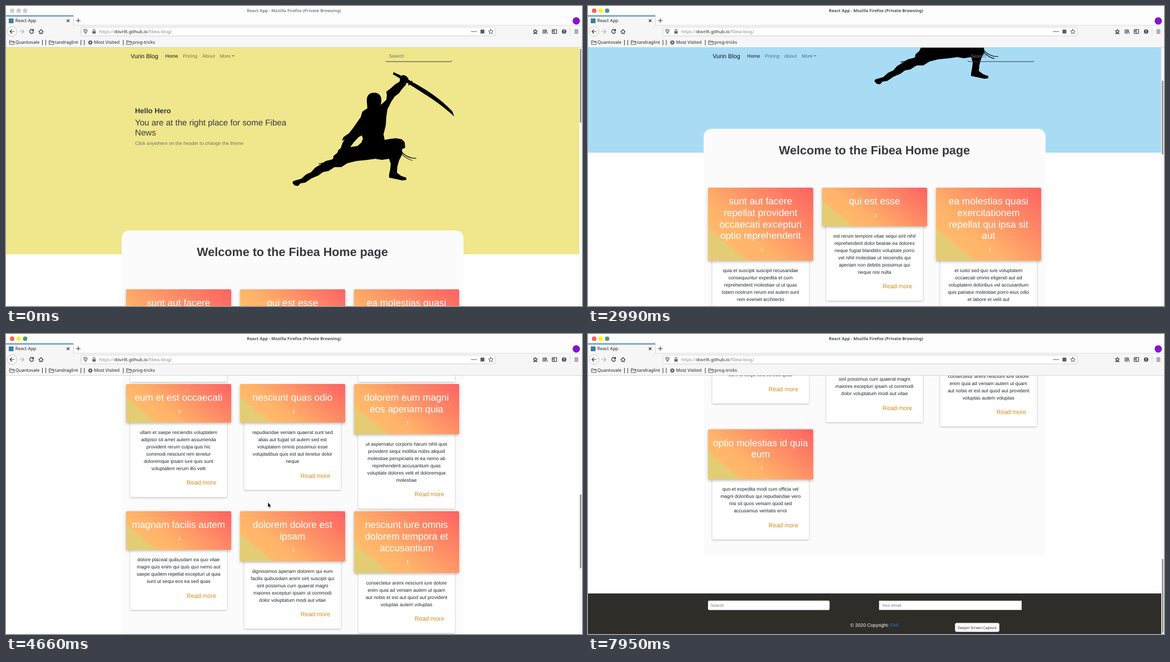
Animation, 1036 px wide and 540 px high, one loop 8150 ms. Source, as an HTML page:

```html
<!DOCTYPE html>
<html lang="en">
<head>
<meta charset="utf-8">
<title>React App</title>
<style>
html, body { margin: 0; width: 100%; height: 100%; overflow: hidden; background: #fff; }
svg { display: block; width: 1036px; height: 540px; }
text { font-family: "Liberation Sans", Arial, sans-serif; text-rendering: geometricPrecision; white-space: pre; }
.ui { font-family: "Noto Sans", sans-serif; }
.mid { text-anchor: middle; }
.end { text-anchor: end; }
.bold { font-weight: 700; }
.icon { fill: none; stroke: #35363b; stroke-width: 1.1; stroke-linejoin: round; stroke-linecap: round; }
.head { filter: drop-shadow(0 2.5px 2.8px rgba(0,0,0,.27)); }
.card { filter: drop-shadow(0 1px 1.6px rgba(0,0,0,.27)); }
</style>
</head>
<body>
<svg id="stage" viewBox="0 0 1036 540" xmlns="http://www.w3.org/2000/svg"></svg>
<script>
const LOOP = 8150;
const ZOOM = 1036 / 1920;
const COLS = [216, 421, 626];
const ROWS = [510, 766.7, 995.7, 1219.7];
const HEAD_W = 189;

// Each post: title lines | body lines
const POSTS = [
  "sunt aut facere/repellat provident/occaecati excepturi/optio reprehenderit|quia et suscipit suscipit recusandae/consequuntur expedita et cum/reprehenderit molestiae ut ut quas/totam nostrum rerum est autem sunt/rem eveniet architecto",
  "qui est esse|est rerum tempore vitae sequi sint nihil/reprehenderit dolor beatae ea dolores/neque fugiat blanditiis voluptate porro/vel nihil molestiae ut reiciendis qui/aperiam non debitis possimus qui/neque nisi nulla",
  "ea molestias quasi/exercitationem/repellat qui ipsa sit/aut|et iusto sed quo iure voluptatem/occaecati omnis eligendi aut ad/voluptatem doloribus vel accusantium/quis pariatur molestiae porro eius odio/et labore et velit aut",
  "eum et est occaecati|ullam et saepe reiciendis voluptatem/adipisci sit amet autem assumenda/provident rerum culpa quis hic/commodi nesciunt rem tenetur/doloremque ipsam iure quis sunt/voluptatem rerum illo velit",
  "nesciunt quas odio|repudiandae veniam quaerat sunt sed/alias aut fugiat sit autem sed est/voluptatem omnis possimus esse/voluptatibus quis est aut tenetur dolor/neque",
  "dolorem eum magni/eos aperiam quia|ut aspernatur corporis harum nihil quis/provident sequi mollitia nobis aliquid/molestiae perspiciatis et ea nemo ab/reprehenderit accusantium quas/voluptate dolores velit et doloremque/molestiae",
  "magnam facilis autem|dolore placeat quibusdam ea quo vitae/magni quis enim qui quis quo nemo aut/saepe quidem repellat excepturi ut quia/sunt ut sequi eos ea sed quas",
  "dolorem dolore est/ipsam|dignissimos aperiam dolorem qui eum/facilis quibusdam animi sint suscipit qui/sint possimus cum quaerat magni/maiores excepturi ipsam ut commodi/dolor voluptatum modi aut vitae",
  "nesciunt iure omnis/dolorem tempora et/accusantium|consectetur animi nesciunt iure dolore/enim quia ad veniam autem ut quam/aut nobis et est aut quod aut provident/voluptas autem voluptas",
  "optio molestias id quia/eum|quo et expedita modi cum officia vel/magni doloribus qui repudiandae vero/nisi sit quos veniam quod sed/accusamus veritatis error"
];

const rect = (x, y, w, h, fill, more = "") =>
  `<rect x="${x}" y="${y}" width="${w}" height="${h}" fill="${fill}" ${more}/>`;
const dot = (x, y, r, fill, more = "") =>
  `<circle cx="${x}" cy="${y}" r="${r}" fill="${fill}" ${more}/>`;
const icon = (d, more = "") => `<path class="icon" d="${d}" ${more}/>`;
const text = (x, y, size, str, fill, cls = "") =>
  `<text x="${x}" y="${y}" font-size="${size}" fill="${fill}" class="${cls}">${str}</text>`;
// Page text sizes are given in unscaled CSS pixels
const copy = (x, y, size, str, fill, cls) => text(x, y, size * ZOOM, str, fill, cls);
const ui = (x, y, str, fill = "#202023") => text(x, y, 8, str, fill, "ui");

const headHeight = lines => 48.8 + 20.72 * lines;

// A 40 degree CSS-style gradient for a header with the given number of lines
function gradient(lines) {
  const h = headHeight(lines), a = 40 * Math.PI / 180;
  const sin = Math.sin(a), cos = Math.cos(a), half = (HEAD_W * sin + h * cos) / 2;
  const cx = HEAD_W / 2, cy = h / 2;
  return `<linearGradient id="g${lines}" gradientUnits="userSpaceOnUse"
    x1="${cx - sin * half}" y1="${cy + cos * half}" x2="${cx + sin * half}" y2="${cy - cos * half}">
    <stop offset=".2" stop-color="#e4cc75"/><stop offset=".2" stop-color="#ffba6b"/>
    <stop offset=".36" stop-color="#ffb36a"/><stop offset="1" stop-color="#fd6262"/></linearGradient>`;
}

function card(post, i) {
  const [title, body] = post.split("|").map(s => s.split("/"));
  const h = headHeight(title.length), mid = 94.3;
  const last = h + 17.6 + 12.95 * (body.length - 1);
  return `<g transform="translate(${COLS[i % 3]} ${ROWS[Math.floor(i / 3)]})">
    ${rect(7.5, h - 6, 174, last + 51.7 - h + 6, "#fff", 'rx="2" class="card"')}
    ${rect(0, 0, HEAD_W, h, `url(#g${title.length})`, 'rx="2" class="head"')}
    ${title.map((s, n) => copy(mid, 30.2 + n * 20.72, 32, s, "#fff", "mid")).join("")}
    ${copy(mid + 2, h - 17.4, 16, "1", "#fff", "mid")}
    ${body.map((s, n) => copy(mid, h + 20.6 + n * 12.95, 16, s, "#212529", "mid")).join("")}
    ${copy(162.2, last + 29.5, 20, "Read more", "#d68a16", "end")}</g>`;
}

const ninja = `<g fill="#000">
  <path fill-rule="evenodd" d="M650 184 L649 172 C648 161 654 156 662 156 C671 156 676 162 675 172 L674 178
    L684 169 L685 161 L684 154 L691 149 L700 141 L708 136 L709 128 L714 124 L720 126 L724 131 L721 137 L719 142
    L711 151 L707 157 L699 163 L693 172 L686 186 L684 200 L683 215 L679 231 L681 241
    L692 239 L702 238 L712 240 L717 245 L718 255 L712 258 L713 266 L707 278 L704 289 L703 300
    L711 306 L720 309 L720 313 L713 314 L704 312 L689 309 L689 304 L691 294 L692 284 L689 275
    L676 277 L664 275 L650 277 L630 279 L614 283 L603 290 L591 290 L580 297 L570 299 L562 305 L550 310
    L538 318 L530 319 L525 324 L519 323 L515 318 L517 315 L531 311 L540 303 L549 299 L556 291 L566 285
    L575 279 L588 276 L589 270 L596 264 L598 259 L602 256 L605 247 L609 240 L604 243 L607 236 L617 229
    L624 220 L631 210 L638 200 L641 190Z
    M640 233 L634 236 L625 246 L619 254 L632 252 L639 246 L642 239Z"/>
  <path d="M697 119 L712 126 L723 132 L731 137 C760 152 788 173 803 190 L806 199 C795 188 772 170 752 158
    C742 151 731 145 721 138 L708 130 L696 123Z"/>
  <path d="M723 142 L730 134 L731 136 L725 143Z"/>
  <path fill="none" stroke="#000" stroke-width="1.2" d="M711 262 Q722 275 738 274 M710 264 Q718 275 731 278 M562 284 Q574 283 588 276"/>
</g>`;

const nav = `<g id="nav">
  ${copy(224.3, 93.8, 20, "Vurin Blog", "rgba(0,0,0,.9)")}
  ${copy(286.6, 93.2, 16, "Home", "rgba(0,0,0,.9)")}
  ${["Pricing", "About", "More"].map((s, i) =>
    copy([318, 353, 384.5][i], 93.2, 16, s, "rgba(0,0,0,.5)")).join("")}
  <path d="M406 88.8h4.8l-2.4 2.5z" fill="rgba(0,0,0,.5)"/>
  ${copy(688.8, 92.8, 16, "Search", "#6c757d")}
  <path d="M683 98.5q.3 1.6 2 1.6h115q1.5 0 1.7-1.6" fill="none" stroke="#343a40" stroke-width="1"/>
</g>`;

const page = `<g id="page">
  ${rect(0, 75, 1031, 372, "#f0e68c", 'id="hero"')}
  ${ninja}
  ${copy(232, 192.6, 24, "Hello Hero", "#343a40", "bold")}
  ${copy(232, 215, 28, "You are at the right place for some Fibea", "#343a40")}
  ${copy(232, 233.2, 28, "News", "#343a40")}
  ${copy(232, 250.2, 16, "Click anywhere on the header to change the theme", "#6c757d")}
  <path d="M208 1446.3V420q0-16 16-16H807q16 0 16 16V1446.3z" fill="#fbfbfb"/>
  ${copy(515.2, 450.3, 40, "Welcome to the Fibea Home page", "#343a40", "bold mid")}
  ${POSTS.map(card).join("")}
  ${rect(0, 1515.2, 1031, 80, "#2f2d27")}
  ${rect(216, 1528.3, 218.3, 16.6, "#fff", 'rx="2" stroke="#ced4da" stroke-width=".5"')}
  ${rect(523.5, 1528.3, 256.5, 16.6, "#fff")}
  ${copy(220.6, 1539.2, 14, "Search", "#757c84")}
  ${copy(528.2, 1539.2, 14, "Your email", "#757c84")}
  ${copy(515.2, 1575.6, 16, '© 2020 Copyright: <tspan fill="#1f74dc">Pefi</tspan>', "#fff", "mid")}
</g>`;

const folder = x => icon(`M${x} 62.3h3l1 1.3h4v5.6h-8zM${x} 65h8`, 'style="stroke-width:.8"');
const bar = x => rect(x, 61, 1, 9.5, "#333");

const chrome = `
  ${rect(0, 0, 1036, 75, "#fdfdfd")}
  ${[11, 22.8, 34.4].map(x => dot(x, 8.5, 4, "#cdcdcd", 'class="light"')).join("")}
  <text id="caption" x="518" y="11.2" font-size="7.53" class="ui bold mid">React App - Mozilla Firefox (Private Browsing)</text>
  ${rect(0, 17.5, 121, 18, "#f6f6f6")}${rect(0, 17, 121, 1.6, "#2a72b5")}
  ${rect(121, 18, .7, 17, "#c9c9c9")}${rect(121, 34.5, 915, .8, "#c4c4c4")}
  ${rect(5, 22.5, 8.5, 8.5, "#36809c")}
  ${ui(16.8, 29.4, "React App")}
  ${icon("M109.7 24.5l4 4M113.7 24.5l-4 4")}
  ${icon("M126.4 26.2h7.2M130 22.6v7.2")}
  ${dot(1025.7, 26.8, 6.6, "#8611d6")}
  ${rect(0, 35.2, 1036, 39.8, "#f6f6f6")}${rect(0, 74.2, 1036, .8, "#cfcfcf")}
  ${dot(11, 46, 8.6, "#fff", 'stroke="#b5b5b5" stroke-width=".8"')}
  ${icon("M14.7 46H7.3M10.6 42.5L7.1 46l3.5 3.5")}
  ${icon("M24.8 46h7.2M28.7 42.5l3.5 3.5-3.5 3.5", 'style="stroke:#b2b2b4"')}
  ${icon("M48.8 43.5A3.5 3.5 0 1 0 49.4 47M49.5 42v2.8h-2.8", 'style="stroke-width:1.3"')}
  ${icon("M59 46.2l4-3.9 4 3.9M60.3 45.8v3.9h5.4v-3.9M63 49.4v-2")}
  ${rect(135, 38, 745, 15.8, "#fff", 'rx="1.5" stroke="#c8c8c8" stroke-width=".8"')}
  ${icon("M140 42.8q3 0 3-.8 0 .8 3 .8 .2 5-3 7-3.2-2-3-7M143 43.6v4.6", 'style="stroke-width:.9"')}
  ${rect(155.3, 45.3, 6.2, 4.5, "#6b6b6e", 'rx=".8"')}
  ${icon("M156.6 45.2v-1.3a1.8 1.8 0 0 1 3.6 0v1.3", 'style="stroke:#6b6b6e"')}
  ${ui(167.2, 48.8, 'https://<tspan fill="#1c1c1f">dovrilt.github.io</tspan>/fibea-blog/', "#8a8a8d")}
  ${[838.3, 841.7, 845.1].map(x => dot(x, 46, 1, "#4a4a4f")).join("")}
  ${rect(853.4, 42.6, 7, 7, "#5a5a5f", 'rx=".6"')}
  ${icon("M872 41.8l1.2 2.8 3 .3-2.3 2 .7 3-2.6-1.6-2.6 1.6.7-3-2.3-2 3-.3z", 'style="stroke-width:.8"')}
  ${icon("M952 42l1 2.4 2.6.2-2 1.7.6 2.5-2.2-1.3-2.2 1.3.6-2.5-2-1.7 2.6-.2zM948.3 49.8h7.4")}
  ${icon("M966 42.5v7M968.2 42.5v7M970.3 42.5v7M971.6 43l1.8 6.4")}
  ${icon("M982.4 42.5h8v7h-8zM986 42.5v7M983.7 44.5h1M983.7 46.3h1")}
  ${dot(1003.8, 46, 4, "#45464b")}${dot(1003.8, 44.8, 1.3, "#f6f6f6")}
  <path d="M1001.3 48.6q2.5-2.4 5 0z" fill="#f6f6f6"/>
  ${rect(1014, 39, .7, 14, "#d0d0d0")}
  ${icon("M1022.8 43.3h6.2M1022.8 46h6.2M1022.8 48.7h6.2")}
  ${folder(6.8)}${ui(17, 68.4, "Quantovale")}${bar(65)}${bar(71)}
  ${folder(78)}${ui(88, 68.4, "tandraglint")}${bar(134.3)}${bar(140.3)}
  ${dot(151.7, 65.7, 2.3, "none", 'stroke="#35363b" stroke-width="1.4"')}
  ${dot(151.7, 65.7, 3.4, "none", 'stroke="#35363b" stroke-width="1.2" stroke-dasharray="1.2 1.47"')}
  ${ui(158.2, 68.4, "Most Visited")}${bar(210.5)}
  ${folder(217.3)}${ui(227.5, 68.4, "prog-tricks")}`;

const overlay = `
  ${rect(1031, 75, 5, 465, "#f8f8f8")}
  ${rect(1032.3, 77, 2.4, 133, "#878787", 'id="thumb" rx="1.2"')}
  <g id="beam">${icon("M-1.4-4.6q1.4 0 1.4 1v7.2q0 1-1.4 1M1.4-4.6q-1.4 0-1.4 1v7.2q0 1 1.4 1", 'style="stroke-width:.8"')}</g>
  <path id="arrow" d="M0 0V9.2L2.1 7.3 3.5 10.4 5 9.7 3.6 6.8H6.4Z" fill="#111" stroke="#fff" stroke-width=".5"/>
  <g id="tip">${rect(660.3, 520.2, 79.4, 15.8, "#fff", 'rx="3" stroke="#d5d5d5" stroke-width=".5"')}
  ${text(700, 530.5, 6.5, "Deepin Screen Capture", "#222", "ui mid")}</g>`;

const stage = document.getElementById("stage");
stage.innerHTML = `<defs>${[1, 2, 3, 4].map(gradient).join("")}
  <clipPath id="view"><rect x="0" y="75" width="1031" height="465"/></clipPath></defs>
  ${rect(0, 0, 1036, 540, "#fff")}
  <g clip-path="url(#view)">${page}${nav}</g>${chrome}${overlay}`;

const $ = id => document.getElementById(id);
const [pageEl, heroEl, navEl, thumb, arrow, beam, tip, caption] =
  ["page", "hero", "nav", "thumb", "arrow", "beam", "tip", "caption"].map($);
const lights = [...document.querySelectorAll(".light")];
const LIT = ["#ff5a55", "#fdf315", "#549a6b"];

const linear = p => p;
const out = power => p => 1 - (1 - p) ** power;

// Keys: [time, value..., easing into this key]
function follow(keys, t) {
  const n = keys.findIndex(k => k[0] > t);
  const a = keys[n < 0 ? keys.length - 1 : Math.max(0, n - 1)];
  const b = keys[n < 0 ? keys.length - 1 : n];
  if (a === b) return a[1];
  const p = b[2]((t - a[0]) / (b[0] - a[0]));
  return a[1].map((v, i) => v + (b[1][i] - v) * p);
}

const SCROLL = [
  [0, [0], linear], [2660, [0], linear], [2990, [182.4], linear], [3340, [310.6], out(1.8)],
  [3940, [310.6], linear], [4660, [676.6], out(1.5)], [5190, [676.6], linear],
  [5620, [962.2], linear], [5990, [1048.2], out(1.9)]
];
const KHAKI = [240, 230, 140], PALE = [204, 225, 192], BLUE = [168, 220, 245];
const THEME = [
  [0, KHAKI, linear], [530, KHAKI, linear], [970, PALE, linear],
  [1630, PALE, linear], [1960, BLUE, linear]
];
const POINTER = [
  [0, [471, 303], linear], [5960, [471, 303], linear], [6110, [523, 450], linear],
  [6390, [523, 450], linear], [6530, [596, 507], out(2)],
  [6760, [596, 507], linear], [6930, [653, 541], linear]
];

const move = (el, x, y) => el.setAttribute("transform", `translate(${x} ${y})`);
const show = (el, on) => el.setAttribute("opacity", +on);

function draw(t) {
  const [scroll] = follow(SCROLL, t);
  const [x, y] = follow(POINTER, t);
  const focused = t >= 530;

  move(pageEl, 0, -scroll);
  move(navEl, 0, Math.min(0, 241 - scroll));
  move(thumb, 0, scroll * .313);
  heroEl.setAttribute("fill", `rgb(${follow(THEME, t).map(Math.round)})`);

  lights.forEach((el, i) => el.setAttribute("fill", focused ? LIT[i] : "#cdcdcd"));
  caption.setAttribute("fill", focused ? "#4c5257" : "#80858a");

  move(arrow, x, y);
  move(beam, 470, 306);
  show(beam, t >= 3300 && t < 4010);
  show(arrow, t >= 4010 && t < 6930);
  show(tip, Math.min(1, Math.max(0, (t - 7450) / 160)));
}

const start = performance.now();
function tick() {
  draw((performance.now() - start) % LOOP);
  requestAnimationFrame(tick);
}
tick();
</script>
</body>
</html>
```
